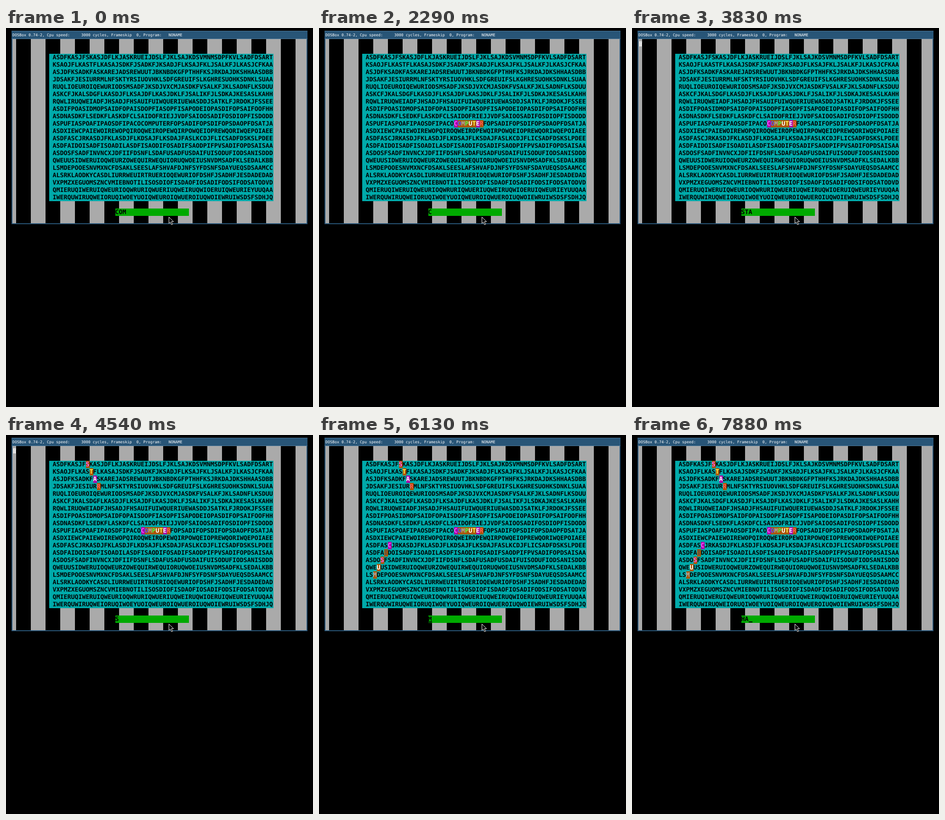
These frames come from a looping animation (668 by 823 pixels, 8000 ms). An HTML page:

```html
<!DOCTYPE html>
<html lang="en">
<head>
<meta charset="utf-8">
<title>Word search</title>
<style>
html, body { margin: 0; width: 100%; height: 100%; overflow: hidden; background: #000; }
svg { display: block; width: 668px; height: 823px; }
text {
  font: bold 13.288px "DejaVu Sans Mono", monospace;
  white-space: pre;
  text-rendering: geometricPrecision;
}
#title { font-size: 8.305px; font-weight: normal; fill: #fff; }
rect, #corner { shape-rendering: crispEdges; }
</style>
</head>
<body>
<svg id="stage" viewBox="0 0 668 823">
  <rect width="668" height="823"/>
  <rect x="12" y="6" width="644" height="420" fill="#285577"/>
  <path d="M12 6.5H656M12 23.5H656" stroke="#4c7899" shape-rendering="crispEdges"/>
  <text id="title" x="14" y="18">DOSBox 0.74-2, Cpu speed:     3000 cycles, Frameskip  0, Program:   NONAME</text>
  <rect x="14" y="24" width="640" height="400"/>
  <g id="stripes" fill="#aaa"></g>
  <rect x="94" y="56" width="488" height="320" fill="#0aa"/>
  <g id="letters"></g>
  <g id="found"></g>
  <rect x="238" y="392" width="160" height="16" fill="#0a0"/>
  <text id="input" x="237.5" y="404"></text>
  <rect id="caret" y="405" width="8" height="2"/>
  <path id="corner" fill="#fff" d="M16 29h6v1h-4v10h-2zM19 31h3v1h-1v8h-2z"/>
  <path d="M354.5 410.5V424.3L357.6 421.4L360.2 427.2L362.6 426.1L360 420.5H364.5Z" stroke="#fff" stroke-linejoin="round"/>
</svg>
<script>
const LOOP = 8000, CELL = 8, ROW = 16;
const $ = id => document.getElementById(id);

const grid = `
ASDFKASJFSKASJDFLKJASKRUEIJDSLFJKLSAJKDSVMNMSDPFKVLSADFDSART
KSAOJFLKASTFLKASAJSDKFJSADKFJKSADJFLKSAJFKLJSALKFJLKASJCFKAA
ASJDFKSADKFASKAREJADSREWUUTJBKNBDKGFPTHHFKSJRKDAJDKSHHAASDBB
JDSAKFJESIURRMLNFSKTYRSIUOVHKLSDFGREUIFSLKGHRESUOHKSDNKLSUAA
RUQLIOEUROIQEWURIODSMSADFJKSDJVXCMJASDKFVSALKFJKLSADNFLKSDUU
ASKCFJKALSDGFLKASDJFLKSAJDFLKASJDKLFJSALIKFJLSDKAJKESASLKAHH
RQWLIRUQWEIADFJHSADJFHSAUIFUIWQUERIUEWASDDJSATKLFJRDOKJFSSEE
ASDIFPOASIDMOPSAIDFOPAISDOPFIASOPFISAPODEIOPASDIFOPSAIFOOFHH
ASDNASDKFLSEDKFLASKDFCLSAIDOFRIEJJVDFSAIOOSADIFOSDIOPFISDODD
ASPUFIASPOAFIPAOSDFIPACOCOMPUTERFOPSADIFOPSDIFOPSDAOPFDSATJA
ASDXIEWCPAIEWOIREWOPQIROQWEIROPEWQIRPOWQEIOPREWQORIWQEPOIAEE
ASDFASCJRKASDJFKLASDJFLKDSAJFLKSDAJFASLKCDJFLICSADFDSKSLPDEE
ASDFAIDOISADFISOADILASDFISAODIFOSADIFSAODPIFPVSADIFOPDSAISAA
ASDOSFSADFINVNCXJDFIIFDSNFLSDAFUSADFUSDAIFUISODUFIODSANISDDD
QWEUUSIDWERUIOQWEURZOWEQUIRWEQUIORUQWOEIUSNVDMSADFKLSEDALKBB
LSMDEPOOESNVMXNCFDSAKLSEESLAFSHVAFDJNFSYFDSNFSDAYUEQSDSAAMCC
ALSRKLAODKYCASDLIURRWEUIRTRUERIOQEWURIOFDSHFJSADHFJESDADEDAD
VXPMZXEGUOMSZNCVMIEBNOTILISOSDIOFISDAOFIOSADIFODSIFODSATODVD
QMIERUQIWERUIQWEURIOQWRURIQWUERIUQWEIRUQWIOERUIQWEURIEYUUQAA
IWERQUWIRUQWEIORUQIWOEYUOIQWEUROIQWUEROIUQWOIEWRUIWSDSFSDHJQ
`.trim().split("\n");

// Column and row of the first letter, direction, and time of discovery
const words = [
  { text: "COMPUTER", col: 24, row: 9, dx: 1, dy: 0, at: 2040 },
  { text: "STAR", col: 9, row: 0, dx: 1, dy: 1, at: 4440 },
  { text: "MUSIC", col: 2, row: 15, dx: 1, dy: -1, at: 6130 }
];
const ink = {
  C: "#f5f", O: "#55f", M: "#aaa", P: "#5f5", U: "#fff", T: "#ff5",
  E: "#fff", R: "#f55", S: "#f55fff", A: "#fff", I: "#555"
};
ink.S = "#f5f";

// First time, last time, evenly spaced states:
// * shows the corner, _ puts the caret after the text, ^ under its first letter
const typing = [
  [0, 0, "COM"],
  [80, 790, "COM_ *COM COM COM_ *COMP COMP COMP_ *COMP"],
  [920, 1040, "COMPU_ *COMPUT COMPUT_"],
  [1710, 2130, "*COMPUT COMPUTE_ COMPUTER *COMPUTER C C^"],
  [2290, 2460, "C *C C^"],
  [2630, 3170, "*C C^ S S_ *S S"],
  [3330, 4130, "S_ *ST ST ST_ STA *STA STA_ STAR STAR_"],
  [4250, 4540, "*STAR STAR S^ *S"],
  [4710, 5420, "S^ *M M_ MU *MU *MUS MUS_ MUS"],
  [5540, 6130, "MUS_ *MUSI MUSI MUSI_ *MUSIC MUSIC_ M^"],
  [6330, 6790, "M *M M^ *M M^ M"],
  [6920, 6920, "M^"],
  [7080, 7880, "*M M^ M *H H_ H *HA HA HA_"]
];
const steps = typing.flatMap(([from, to, list]) => {
  const states = list.split(" ");
  const gap = (to - from) / Math.max(1, states.length - 1);
  return states.map((state, i) => ({ at: Math.floor(from + i * gap), state }));
});

function add(parent, tag, attrs, content = "") {
  const el = document.createElementNS("http://www.w3.org/2000/svg", tag);
  for (const key in attrs) el.setAttribute(key, attrs[key]);
  el.textContent = content;
  return parent.appendChild(el);
}

function letters(parent, col, row, text, fill = "#000") {
  add(parent, "text", { x: 101.5 + col * CELL, y: 68 + row * ROW, fill }, text);
}

add($("stripes"), "rect", { x: 14, y: 24, width: 8, height: 400 });
for (let x = 54; x < 654; x += 64) {
  add($("stripes"), "rect", { x, y: 24, width: Math.min(32, 654 - x), height: 400 });
}
grid.forEach((line, row) => letters($("letters"), 0, row, line));

for (const word of words) {
  word.group = add($("found"), "g", {});
  [...word.text].forEach((ch, i) => {
    const col = word.col + i * word.dx, row = word.row + i * word.dy;
    add(word.group, "rect", {
      x: 102 + col * CELL, y: 56 + row * ROW, width: CELL, height: ROW,
      fill: "CEA".includes(ch) ? "#a0a" : "#a50"
    });
    letters(word.group, col, row, ch, ink[ch]);
  });
}

const show = (el, on) => { el.style.visibility = on ? "visible" : "hidden"; };
let shown;

function draw(t) {
  const { state } = steps.findLast(step => step.at <= t);
  for (const word of words) show(word.group, t >= word.at);
  if (state === shown) return;
  shown = state;
  const text = state.replace(/[*_^]/g, "");
  $("input").textContent = text;
  $("caret").setAttribute("x", 238 + (state.endsWith("_") ? text.length * CELL : 0));
  show($("caret"), /[_^]$/.test(state));
  show($("corner"), state.startsWith("*"));
}

const start = performance.now();
function tick() {
  draw((performance.now() - start) % LOOP);
  requestAnimationFrame(tick);
}
tick();
</script>
</body>
</html>
```
